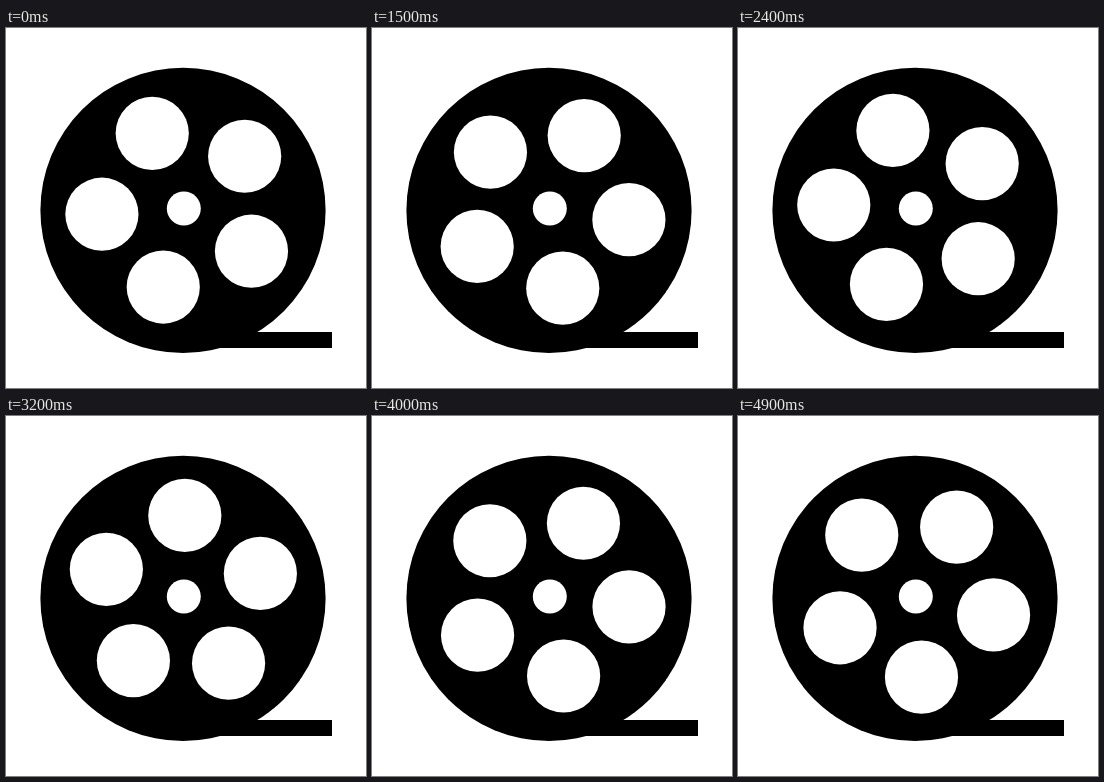
An HTML page that plays this animation: 360 by 360 pixels, repeating every 5 s.

```html
<!DOCTYPE html>
<html lang="en">
<head>
<meta charset="utf-8">
<title>Film reel</title>
<style>
  html, body { margin: 0; width: 100%; height: 100%; overflow: hidden; background: #fff; }
  svg { display: block; width: 100%; height: 100%; }
</style>
</head>
<body>
<svg viewBox="0 0 360 360">
  <circle cx="177" cy="182.4" r="142.6"/>
  <rect x="200" y="304" width="126" height="16"/>
  <g id="holes" fill="#fff"></g>
  <circle cx="177.8" cy="180.5" r="17" fill="#fff"/>
</svg>
<script>
const LOOP = 5000, STEP = 100;
const HUB = { x: 176.7, y: 180.4 };
const ORBIT = 81, HOLE = 36.6, COUNT = 5;
const START = 31.9;

// [step, degrees turned, degrees per step]
const KEYS = [
  [0, 0, 17],
  [8, 104.9, 12.4],
  [15, 192.1, 12],
  [24, 294.5, 11],
  [32, 383.6, 11.4],
  [40, 479.5, 13.6],
  [49, 629.3, 18.5],
  [50, 648, 18.5]
];

const group = document.getElementById('holes');
const holes = Array.from({ length: COUNT }, () => {
  const hole = document.createElementNS('http://www.w3.org/2000/svg', 'circle');
  hole.setAttribute('r', HOLE);
  return group.appendChild(hole);
});

// Cubic Hermite curve through the keys
function turned(n) {
  const i = KEYS.findIndex(key => key[0] > n);
  const [n0, a0, v0] = KEYS[i - 1];
  const [n1, a1, v1] = KEYS[i];
  const span = n1 - n0, u = (n - n0) / span;
  const rise = u * u * (3 - 2 * u);
  return a0 + (a1 - a0) * rise
    + span * u * (1 - u) * (v0 * (1 - u) - v1 * u);
}

function draw(ms) {
  const angle = START + turned(Math.floor((ms % LOOP) / STEP));
  holes.forEach((hole, i) => {
    const rad = (angle + i * 360 / COUNT) * Math.PI / 180;
    hole.setAttribute('cx', HUB.x + ORBIT * Math.cos(rad));
    hole.setAttribute('cy', HUB.y + ORBIT * Math.sin(rad));
  });
}

const begin = performance.now();
function tick() {
  draw(performance.now() - begin);
  requestAnimationFrame(tick);
}
tick();
</script>
</body>
</html>
```
